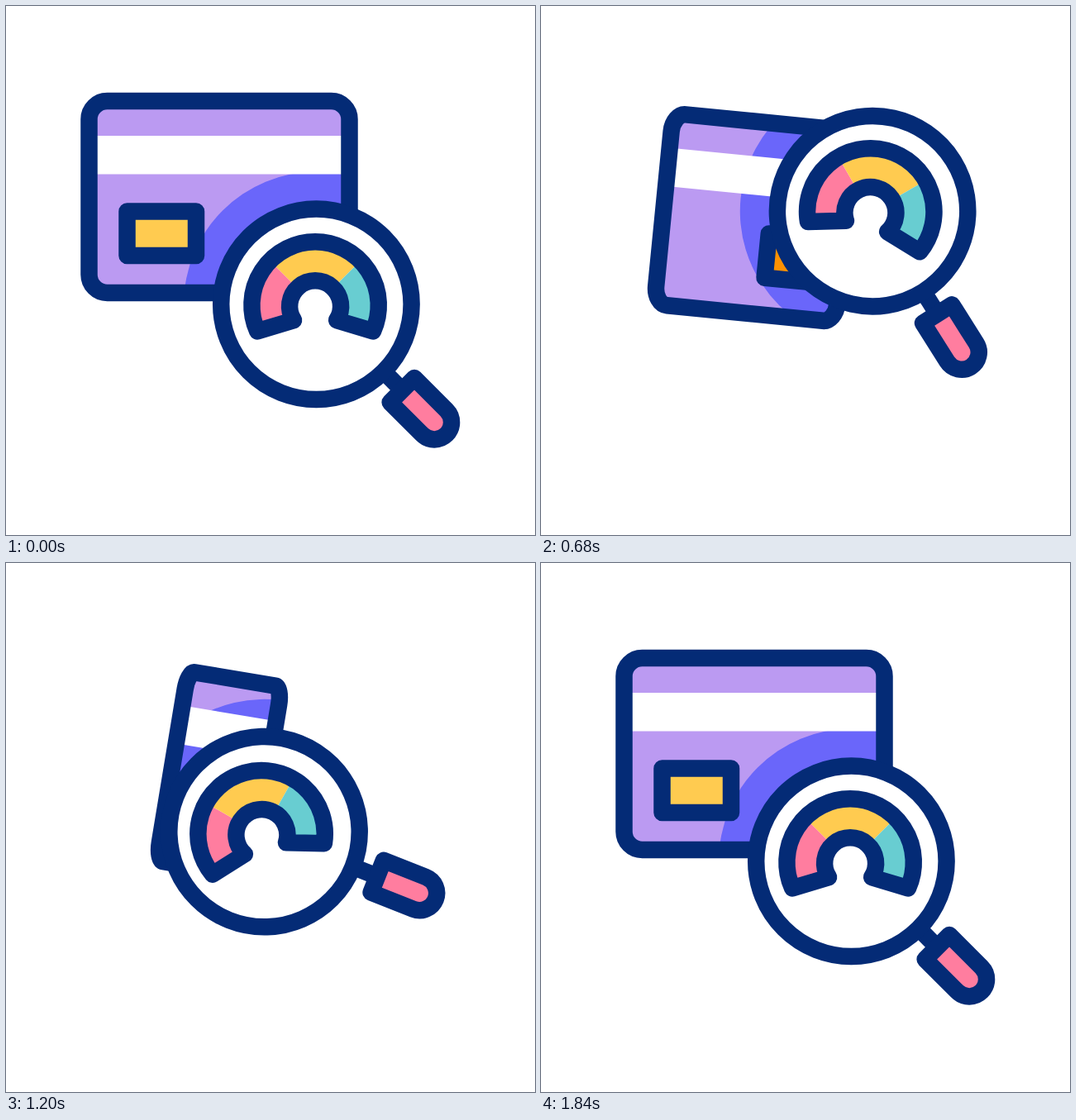
Write an HTML page that moves like this. It is 640x640 px and loops after 1920 ms.

```html
<!DOCTYPE html>
<html lang="en">
<head>
<meta charset="utf-8">
<title>Card check</title>
<style>
  html, body { margin: 0; width: 100%; height: 100%; overflow: hidden; background: #fff; }
  svg { display: block; width: 100vw; height: 100vh; }
  .line { fill: none; stroke: #042b76; stroke-width: 20.5; stroke-linejoin: round; }
</style>
</head>
<body>
<svg viewBox="0 0 640 640">
  <defs>
    <clipPath id="cardClip"><rect class="cardShape"/></clipPath>
    <clipPath id="chipClip"><rect class="chipShape"/></clipPath>
  </defs>
  <g id="card">
    <g clip-path="url(#cardClip)">
      <rect class="cardShape" fill="#bb9af2"/>
      <circle class="shade" r="160.3" fill="#6a66fa"/>
      <rect x="-170" y="-74" width="340" height="46.5" fill="#fff"/>
      <rect class="chipShape" fill="#ffcb50"/>
      <g clip-path="url(#chipClip)"><circle class="shade" r="160.3" fill="#ff9100"/></g>
      <rect class="chipShape line"/>
    </g>
    <rect class="cardShape line"/>
  </g>
  <g id="lens">
    <g transform="rotate(45)">
      <path class="line" d="M115 0H147"/>
      <path class="line" style="fill:#ff7d9f" d="M147-20.8H202A20.8 20.8 0 0 1 202 20.8H147Z"/>
    </g>
    <circle class="line" style="fill:#fff" r="115.2"/>
    <g id="gauge">
      <g transform="translate(0 22)">
        <g id="bands" fill="none" stroke-width="46"></g>
        <path class="line" d="M-70 30.4A76.7 76.7 0 1 1 70 30.4L26 17.2A31 31 0 1 0-26 17.2Z"/>
      </g>
    </g>
  </g>
</svg>
<script>
const LOOP = 1920, STEP = 40;
const CARD = { x: 258, halfW: 157.5, halfH: 116, radius: 22 };
const CHIP = { left: -111.5, right: -28, top: 17.5, height: 53.5 };

const easeInOut = u => u < 0.5 ? 4 * u ** 3 : 1 - 4 * (1 - u) ** 3;

// Every property rests at a value and is pushed away and back by eased moves.
function poseAt(t) {
  const move = (from, to, by) =>
    by * easeInOut(Math.min(Math.max((t - from) / (to - from), 0), 1));
  return {
    turn: 1 + move(35, 1005, -2) + move(833, 1687, 2),
    tilt: move(80, 560, 10) + move(540, 900, -18.6) + move(940, 1240, 18.2) + move(1180, 1700, -9.6),
    cardY: 231 + move(85, 930, 28) + move(920, 1760, -28),
    lensX: 375.4 + move(120, 760, 26) + move(640, 1240, -89) + move(1280, 1760, 63),
    lensY: 360.8 + move(120, 760, -113.5) + move(760, 1240, 78) + move(1200, 1700, 35.5),
    swing: move(80, 640, 12.8) + move(640, 1150, -36.3) + move(1150, 1710, 23.5),
    dial: move(80, 480, 23) + move(430, 1100, -38.5) + move(1380, 1840, 15.5)
  };
}

const rad = deg => deg * Math.PI / 180;
const setAttrs = (el, attrs) => {
  for (const name in attrs) el.setAttribute(name, attrs[name]);
};
const setAll = (selector, attrs) =>
  document.querySelectorAll(selector).forEach(el => setAttrs(el, attrs));
const place = (id, x, y, angle) =>
  setAttrs(document.getElementById(id), { transform: `translate(${x} ${y}) rotate(${angle})` });

function addBand(from, to, color) {
  const point = deg => `${54 * Math.cos(rad(deg))} ${54 * Math.sin(rad(deg))}`;
  const path = document.createElementNS("http://www.w3.org/2000/svg", "path");
  setAttrs(path, { d: `M${point(from)}A54 54 0 0 1 ${point(to)}`, stroke: color });
  document.getElementById("bands").append(path);
}

function draw(t) {
  const { turn, tilt, cardY, lensX, lensY, swing, dial } = poseAt(t);

  // Turning narrows the outlines but keeps their line weight.
  const scale = Math.max(Math.abs(turn), 0.004);
  place("card", CARD.x, cardY, tilt);
  setAll(".cardShape", {
    x: -CARD.halfW * scale, y: -CARD.halfH,
    width: 2 * CARD.halfW * scale, height: 2 * CARD.halfH,
    rx: CARD.radius * scale, ry: CARD.radius
  });
  setAll(".chipShape", {
    x: Math.min(CHIP.left * turn, CHIP.right * turn), y: CHIP.top,
    width: (CHIP.right - CHIP.left) * scale, height: CHIP.height
  });

  // The shade stays centred on the lens, in the card's own coordinates.
  const dx = lensX - CARD.x, dy = lensY - cardY;
  const cos = Math.cos(rad(tilt)), sin = Math.sin(rad(tilt));
  setAll(".shade", { cx: dx * cos + dy * sin, cy: dy * cos - dx * sin });

  place("lens", lensX, lensY, swing);
  place("gauge", -1.3, -19.8, dial - swing);
}

addBand(153, 225, "#ff7d9f");
addBand(225, 315, "#ffcb50");
addBand(315, 387, "#68cdd1");

const start = performance.now();
function tick() {
  const t = (performance.now() - start) % LOOP;
  draw(Math.floor(t / STEP) * STEP);
  requestAnimationFrame(tick);
}
tick();
</script>
</body>
</html>
```
